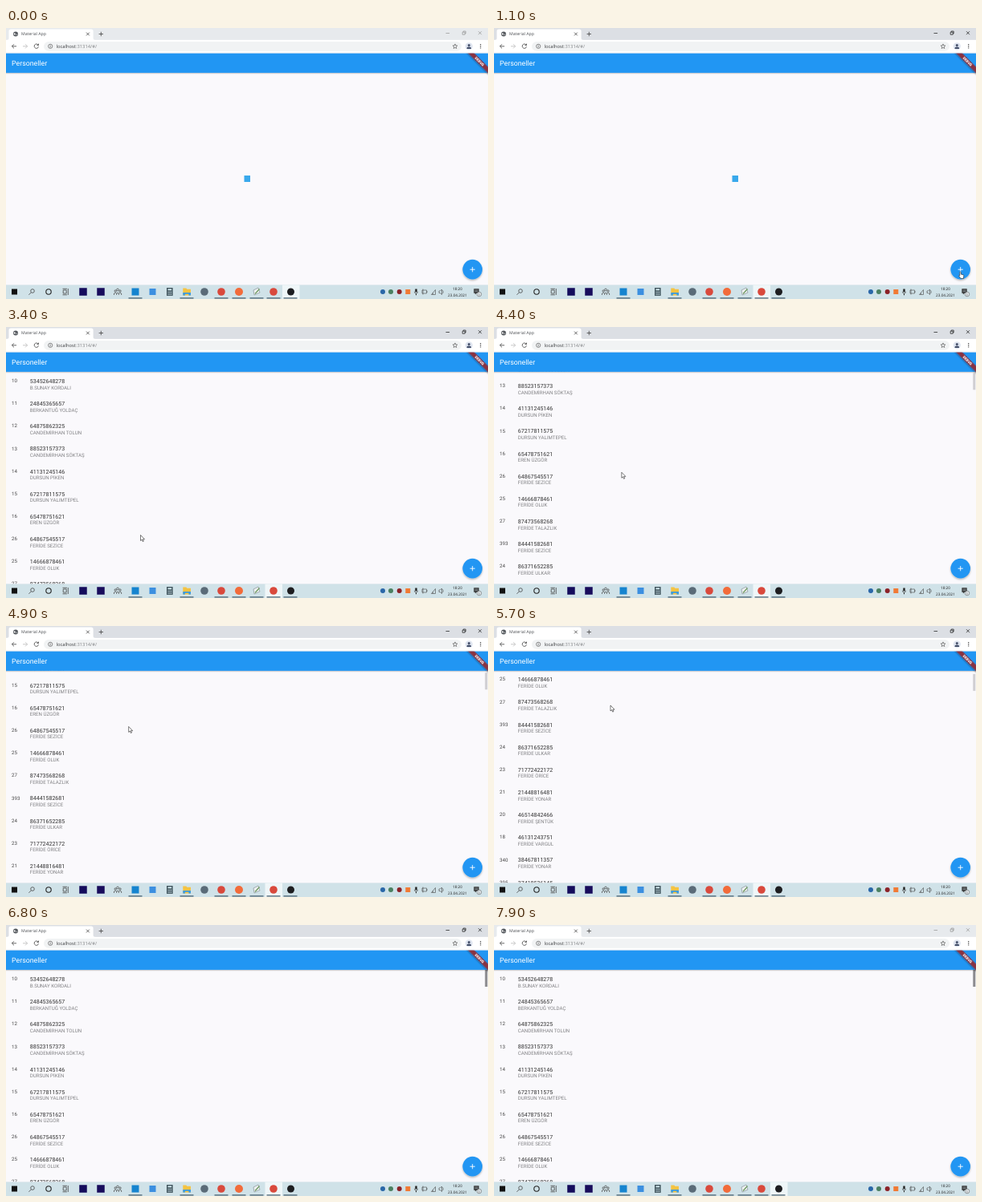
Recreate the animation shown at these times as an HTML page. Size 600 px wide and 338 px high, loop 8 s.

```html
<!DOCTYPE html>
<html lang="tr">
<head>
<meta charset="utf-8">
<title>Material App</title>
<style>
html, body { margin: 0; width: 100%; height: 100%; overflow: hidden; background: #faf9fc; }
svg { display: block; width: 100vw; height: 100vh; }
text { font-family: Roboto, sans-serif; text-rendering: geometricPrecision; }
.ui { font-family: "Open Sans", sans-serif; }
.line { fill: none; stroke: #444; stroke-width: .8; }
</style>
</head>
<body>
<svg viewBox="0 0 600 338" preserveAspectRatio="none">
  <defs>
    <linearGradient id="shade" x2="0" y2="1">
      <stop stop-color="#000" stop-opacity=".25"/><stop offset="1" stop-color="#000" stop-opacity="0"/>
    </linearGradient>
    <filter id="drop" x="-40%" y="-40%" width="180%" height="180%">
      <feDropShadow dx="0" dy="1.3" stdDeviation="1.2" flood-opacity=".3"/>
    </filter>
    <clipPath id="page"><rect y="31.2" width="600" height="289.2"/></clipPath>
  </defs>

  <rect width="600" height="338" fill="#faf9fc"/>
  <rect id="splash" x="296.5" y="184" width="7.5" height="8" fill="#39a9ec"/>
  <g id="list" clip-path="url(#page)"><g id="rows"></g></g>
  <rect id="thumb" x="596.3" y="56" width="3" height="21"/>

  <g clip-path="url(#page)">
    <rect y="55.8" width="600" height="2" fill="url(#shade)"/>
    <rect y="31.2" width="600" height="24.7" fill="#2196f3"/>
    <text x="7" y="46.7" font-size="8.8" fill="#fff">Personeller</text>
    <g transform="translate(600 31.2) rotate(45)">
      <rect x="-20" y="12.3" width="40" height="5.3" fill="#8b3040" filter="url(#drop)"/>
      <text y="16.5" font-size="4.5" font-weight="900" fill="#fff" text-anchor="middle">DEBUG</text>
    </g>
    <circle cx="580.7" cy="301.1" r="12.3" fill="#2196f3" filter="url(#drop)"/>
    <path d="M577.6 301.2h6.2M580.7 298.1v6.2" stroke="#fff" stroke-width=".9"/>
  </g>

  <g id="browser">
    <rect id="strip" width="600" height="15"/>
    <path d="M1 15q2.5 0 2.5-2.5V4q0-2.6 2.6-2.6H106q2.6 0 2.6 2.6v8.5q0 2.5 2.5 2.5z" fill="#fff"/>
    <rect y="14.9" width="600" height="16.3" fill="#fff"/>
    <rect y="30.8" width="600" height=".4" fill="#dadce0"/>
    <circle cx="12" cy="7.6" r="3" fill="#55595e"/>
    <path d="M10 6.2l2 .8-.6 1.7-1.7-.6M12.6 9.6l.5-1.8 1.4-.2" fill="#fff"/>
    <text class="ui" x="19" y="9.4" font-size="5.2" fill="#4a4d51">Material App</text>
    <path class="line" d="M100 5.6l3.8 3.8m0-3.8l-3.8 3.8M115.6 7.5h5.4m-2.7-2.7v5.4"/>
    <path id="buttons" fill="none" stroke-width=".75" d="M547.5 6.5h4.6M568.2 5.2h3v3h-3zM569.2 5v-1h3v3h-1M588 4.2l4 4m0-4l-4 4"/>
    <path class="line" d="M13 22.8H7.4m2.6-2.6l-2.6 2.6 2.6 2.6"/>
    <path class="line" style="stroke:#bbb" d="M21 22.8h5.6m-2.6-2.6l2.6 2.6-2.6 2.6"/>
    <path class="line" d="M40 21a2.7 2.7 0 1 0 .5 2.3M40.5 19.6v2h-2"/>
    <rect x="47" y="17" width="520" height="11.8" rx="5.9" fill="#f1f3f4"/>
    <circle class="line" cx="55.2" cy="22.8" r="2.6" style="stroke-width:.6"/>
    <path class="line" style="stroke-width:.7" d="M55.2 22.4v1.8m0-3.1v.6"/>
    <text class="ui" x="62.6" y="24.8" font-size="5.8" fill="#808386">
      <tspan fill="#3a3c3f">localhost</tspan>:31314/#/</text>
    <path class="line" style="stroke-width:.6" d="M559 19.9l.8 2 2.1.1-1.6 1.4.5 2.1-1.8-1.1-1.8 1.1.5-2.1-1.6-1.4 2.1-.1z"/>
    <circle cx="576.3" cy="22.8" r="4.6" fill="#dfe5f0"/>
    <path d="M573.5 25.9q0-2.4 2.8-2.4t2.8 2.4z" fill="#45506a"/>
    <circle cx="576.3" cy="21.6" r="1.5" fill="#45506a"/>
    <path d="M590.7 20v1.2m0 1v1.2m0 1v1.2" stroke="#444" stroke-width="1.2"/>
  </g>

  <g id="taskbar">
    <rect y="320.4" width="600" height="17.6" fill="#d0e2e8"/>
    <rect id="active" y="320.4" width="21.5" height="17.6" fill="#eff6f8"/>
    <g id="icons"></g>
    <circle class="line" cx="33" cy="328" r="2.3"/><path class="line" d="M31.4 329.8l-3 3"/>
    <circle class="line" cx="53" cy="329" r="3.2" style="stroke:#222;stroke-width:1.1"/>
    <path class="line" d="M71.2 327h4v4h-4zM70.5 325.3h5.4M70.5 332.8h5.4M77.3 325v8"/>
    <g class="line" style="stroke-width:.7">
      <circle cx="139" cy="326.5" r="1.4"/><circle cx="136.2" cy="328" r="1.2"/><circle cx="142" cy="328" r="1.2"/>
      <path d="M134.5 333v-2q1.7-2 3.2 0 1.3-1.6 2.7 0 1.6-2 3.2 0v2M137.7 333v-2M140.4 333v-2"/>
    </g>
    <rect x="200" y="324" width="7.6" height="10" fill="#43565f"/>
    <path d="M201.5 326.3h4.6" stroke="#d6edf3" stroke-width="1.8"/>
    <path d="M201.5 329h4.6m-4.6 1.8h4.6m-4.6 1.8h4.6" stroke="#d6edf3" stroke-dasharray="1 .8"/>
    <path d="M220.3 324.5h4l1 1.2h4.7v7.8h-9.7z" fill="#f5c342"/>
    <path d="M220.3 330h9.7v3.5h-2.6v-1.7h-4.5v1.7h-2.6z" fill="#3b9be0"/>
    <path d="M309 333l-1-6 6-3 2 6z" fill="#eef1f2" stroke="#879299" stroke-width=".7"/>
    <path d="M310 331.5l5.5-6" stroke="#6f9a62" stroke-width="1.3"/>
    <path d="M509.3 325.5h2.4v4h-2.4zM510 331.2h1v2h-1z" fill="#222"/>
    <path class="line" style="stroke-width:.6" d="M508.3 328.7q0 2.5 2.2 2.5t2.2-2.5M518 327h5.6v4H518zM524 328v2M519 325.5v7M529.5 332.5l5-6v6zM531.5 332.3v-2M539 328h1.5l2-2v6.5l-2-2H539zM543.6 327.2q1.4 2 0 4"/>
    <g font-size="4.7" fill="#222" text-anchor="middle">
      <text class="ui" x="562" y="327">18:20</text><text class="ui" x="562" y="335">23.04.2021</text>
    </g>
    <path d="M582.4 325.3h6.3v5.5h-3.2l-1.6 1.8v-1.8h-1.5z" fill="#333"/>
    <path d="M583.6 327h4m-4 1.7h4" stroke="#d0e2e8" stroke-width=".5"/>
    <circle cx="589" cy="332" r="2.8" fill="#e8eef1" stroke="#444" stroke-width=".5"/>
    <text class="ui" x="589" y="333.5" font-size="4" text-anchor="middle">1</text>
  </g>

  <g id="cursor" stroke="#222" stroke-width=".6" fill="#fff" stroke-linejoin="round">
    <path id="arrow" d="M0 0v7l1.6-1.4 1.1 2.5 1.2-.5-1.1-2.4H5z"/>
    <path id="hand" d="M.3 1q.8-1 1.5 0v2.6l3 .8q.7.3.5 1.2L4.8 9H1.6L-1 5.6q.2-1.1 1.3-.1z"/>
  </g>
</svg>
<script>
const $ = id => document.getElementById(id);
const LOOP = 8000, PITCH = 28.15;

const ids = [10, 11, 12, 13, 14, 15, 16, 26, 25, 27, 393, 24, 23, 21, 20, 18, 340, 395];
const names = ["B.SUNAY KORDALI", "BERKANTUĞ YOLDAÇ", "CANDEMİRHAN TOLUN", "CANDEMİRHAN SÖKTAŞ",
  "DURSUN PİKEN", "DURSUN YALIMTEPEL", "EREN ÜZGÖR", "FERİDE SEZİCE", "FERİDE OLUK",
  "FERİDE TALAZLIK", "FERİDE SEZİCE", "FERİDE ULKAR", "FERİDE ÖRİCE", "FERİDE YONAR",
  "FERİDE ŞENTÜK", "FERİDE VARGUL", "FERİDE YONAR", "FERİDE OLUK"];

// Seeded eleven-digit number for each row
const digit = n => 1 + Math.floor(Math.abs(Math.sin(n * 12.9898) * 43758.5) % 1 * 8);
const number = row => Array.from({ length: 11 }, (_, k) => digit(row * 11 + k + 3)).join("");

const label = (x, y, size, fill, text) =>
  `<text x="${x}" y="${y}" font-size="${size}" fill="${fill}">${text}</text>`;

$("rows").innerHTML = names.map((name, i) => {
  const y = i * PITCH;
  return label(7, 69.1 + y, 6.15, "#444", ids[i]) +
    label(29.8, 70 + y, 7.03, "#333", number(i)) +
    label(29.8, 77.5 + y, 6.15, "#808083", name);
}).join("");

const square = (x, size, fill) =>
  `<rect x="${x - size / 2}" y="${329 - size / 2}" width="${size}" height="${size}" fill="${fill}"/>`;
const dot = (x, r, fill) => `<circle cx="${x}" cy="329" r="${r}" fill="${fill}"/>`;

$("icons").innerHTML =
  square(10.5, 7, "#111") + square(96, 9.5, "#140c5c") + square(118, 9.5, "#180c5c") +
  square(161, 9, "#1684cf") + square(182.5, 8, "#3c8fe0") +
  dot(247, 4.8, "#5a6b78") + dot(268, 4.8, "#d9493c") + dot(290, 5, "#f26b3a") +
  dot(333, 4.8, "#d9493c") + dot(354.5, 4.5, "#1d1d20") +
  dot(469, 3, "#2a67a8") + dot(479, 3, "#4a8061") + dot(489.7, 3, "#8c2228") + square(500.3, 6, "#f07a35") +
  [161, 225, 268, 290, 312, 333, 354].map(x =>
    `<rect x="${x - 8.5}" y="336.3" width="17" height="1.2" fill="#3f5968"/>`).join("");

// Keys are [time, ...values], joined by straight segments
function at(keys, t) {
  const n = keys.findIndex(k => k[0] > t);
  if (n < 0) return keys[keys.length - 1].slice(1);
  if (n === 0) return keys[0].slice(1);
  const a = keys[n - 1], b = keys[n], p = (t - a[0]) / (b[0] - a[0]);
  return a.slice(1).map((v, i) => v + (b[i + 1] - v) * p);
}

const pointer = [[300, 560, 345], [900, 579.5, 303.5], [1500, 579.5, 303.5], [1900, 540, 302],
  [2700, 250, 289], [2900, 167.5, 259.5], [3700, 167.5, 259.5], [4900, 152.7, 125.5],
  [5200, 145, 99], [5750, 145, 99], [6450, 150, 324], [6650, 152, 345]];
const scroll = [[3700, 0], [4900, 134], [5200, 160.5], [5400, 205], [5650, 225.9],
  [5750, 225.9], [6450, 0]];

const show = (id, on) => $(id).setAttribute("visibility", on ? "visible" : "hidden");

function draw(now) {
  const t = now % LOOP;
  const focused = t >= 600 && t < 7800;
  const loaded = t >= 1800;
  const [offset] = at(scroll, t), [x, y] = at(pointer, t);

  $("strip").setAttribute("fill", focused ? "#dcdfe4" : "#e7eaed");
  $("buttons").setAttribute("stroke", focused ? "#222" : "#999");
  $("active").setAttribute("x", focused ? 322.5 : 344);

  show("splash", !loaded);
  show("list", loaded);
  $("rows").setAttribute("transform", `translate(0 ${-offset})`);
  show("thumb", t >= 3700);
  $("thumb").setAttribute("y", 56 + offset * .017);
  $("thumb").setAttribute("fill", t < 6000 ? "#cfced2" : "#8b8a8e");

  const overButton = Math.hypot(x - 580.7, y - 301.1) < 12.3;
  $("cursor").setAttribute("transform", `translate(${x} ${y})`);
  show("hand", overButton);
  show("arrow", !overButton);
}

const start = performance.now();
function tick() {
  draw(performance.now() - start);
  requestAnimationFrame(tick);
}
tick();
</script>
</body>
</html>
```
